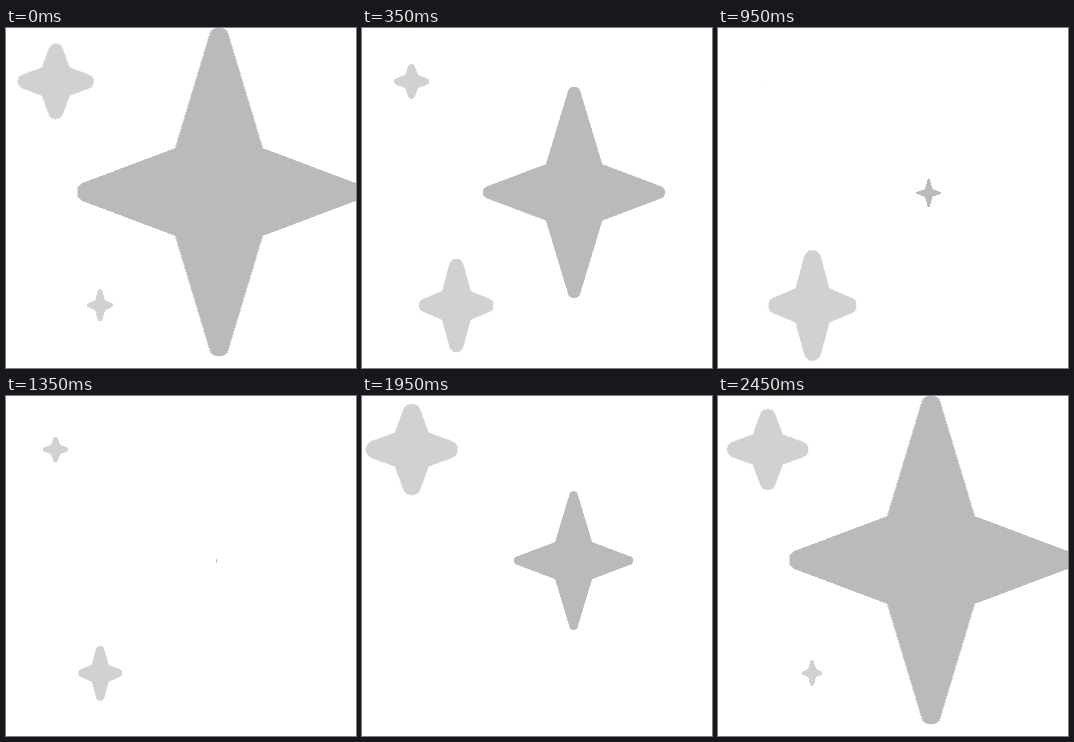
These frames come from a looping animation (350x340 px, 2.5 s). An HTML page:

```html
<!DOCTYPE html>
<html lang="en">
<head>
<meta charset="utf-8">
<title>Twinkling stars</title>
<style>
  html, body { margin: 0; width: 100%; height: 100%; overflow: hidden; background: #fff; }
  svg { display: block; width: 350px; height: 340px; shape-rendering: crispEdges; }

  #large { fill: #bababa; animation: shrink 1250ms cubic-bezier(.3, .42, .65, 1) infinite alternate; }
  #upper { fill: #d1d1d1; animation: shrink 1250ms cubic-bezier(.2, 0, .62, 1) -350ms infinite alternate; }
  #lower { fill: #d1d1d1; animation: pulse 2500ms -1780ms infinite; }

  /* Short rest at full size, then down to nothing */
  @keyframes shrink {
    0%, 4% { transform: scale(1); }
    100% { transform: scale(0); }
  }
  /* Quick fall, slower start on the way back */
  @keyframes pulse {
    0% { transform: scale(1); animation-timing-function: cubic-bezier(.23, 0, .65, 1); }
    50% { transform: scale(0); animation-timing-function: cubic-bezier(.56, 0, .65, 1); }
    100% { transform: scale(1); }
  }
</style>
</head>
<body>
<svg id="stage" viewBox="0 0 350 340"></svg>
<script>
// x, y: point the star shrinks to; dx, dy: its middle from there at full size
// w, h: half width and half height; c: inner corner; r: radius of the caps
const stars = [
  { id: 'large', x: 210.5, y: 165, dx: 2.5, dy: -1, w: 142, h: 164.5, c: 43.9, r: 10 },
  { id: 'upper', x: 49.5, y: 53.5, dx: 0.3, dy: 0, w: 50, h: 49.7, c: 18.5, r: 10 },
  { id: 'lower', x: 94, y: 277, dx: 0.5, dy: 0.5, w: 51, h: 64, c: 19.6, r: 9.8 }
];

// Point where a straight edge meets the round cap of an arm: [sideways, along]
function tangent(len, c, r) {
  const rise = len - r - c;
  const d = Math.hypot(c, rise);
  const a = Math.atan2(c, rise) - Math.asin(r / d);
  const l = Math.sqrt(d * d - r * r);
  return [c - l * Math.sin(a), c + l * Math.cos(a)];
}

function outline({ w, h, c, r }) {
  const [vx, vy] = tangent(h, c, r);
  const [hy, hx] = tangent(w, c, r);
  const arc = `A${r} ${r} 0 0 1 `;
  return `M${-c} ${-c}L${-vx} ${-vy}${arc}${vx} ${-vy}L${c} ${-c}` +
         `L${hx} ${-hy}${arc}${hx} ${hy}L${c} ${c}` +
         `L${vx} ${vy}${arc}${-vx} ${vy}L${-c} ${c}` +
         `L${-hx} ${hy}${arc}${-hx} ${-hy}Z`;
}

document.getElementById('stage').innerHTML = stars.map(s =>
  `<g transform="translate(${s.x} ${s.y})"><g id="${s.id}">` +
  `<path transform="translate(${s.dx} ${s.dy})" d="${outline(s)}"/></g></g>`
).join('');
</script>
</body>
</html>
```
